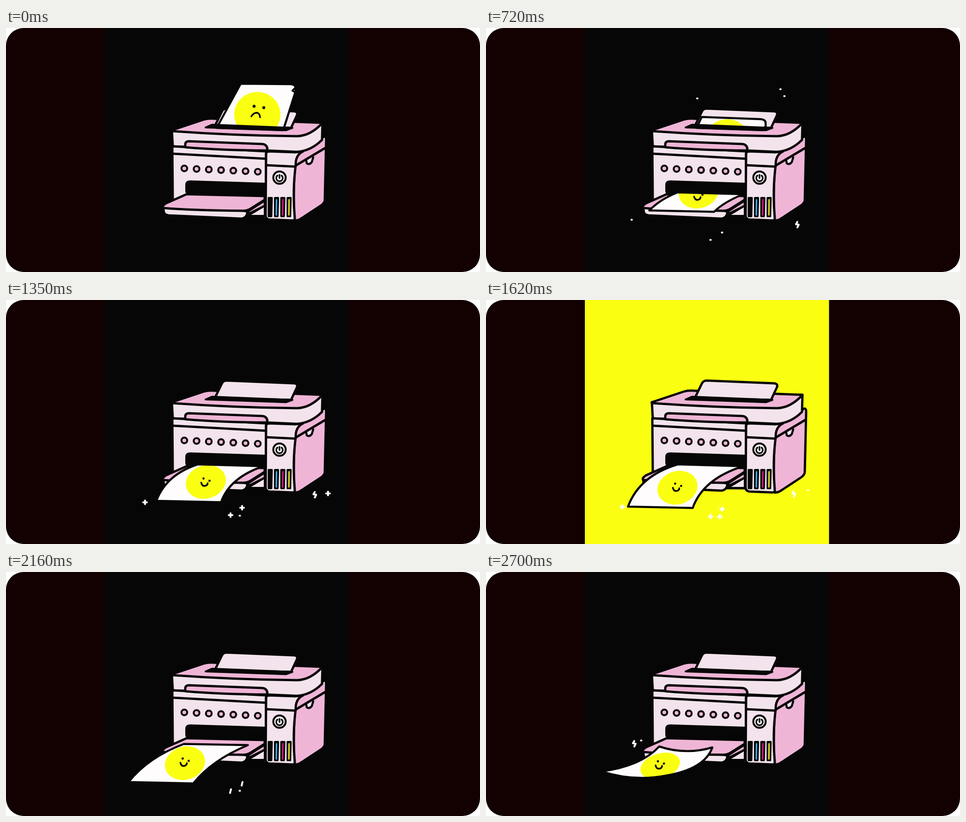
Write an HTML page with a canvas that moves like this. It is 1026 px wide and 530 px high and loops after 2790 ms.

```html
<!DOCTYPE html>
<html lang="en">
<head>
<meta charset="utf-8">
<title>Printer</title>
<style>
html, body { margin: 0; width: 100%; height: 100%; overflow: hidden; background: #fff; }
canvas { display: block; border-radius: 38px; background: #130000; }
</style>
</head>
<body>
<canvas id="stage" width="1026" height="530"></canvas>
<script>
const ctx = document.getElementById('stage').getContext('2d');
const INK = '#060606', LIGHT = '#f3e3ec', PINK = '#efb5d6', WHITE = '#fffcfe', YELLOW = '#faff12';
const STEP = 90, STEPS = 31;
const HELD = [7, 14, 28];   // steps that repeat the previous pose

// start, end, looks over its life, sideways spread, fall, colour, places
const SPARKS = [
  [180, 800, '|.', -0.06, 55, WHITE, [[455, 105], [645, 85], [654, 100]]],
  [180, 400, '|', 0, 5, WHITE, [[434, 158]]],
  [180, 400, '.', 0, 2, INK, [[658, 164], [296, 423], [324, 435]]],
  [600, 2250, '.++|', 0, 18, WHITE, [[511, 443], [486, 459]]],
  [600, 1800, '.++', 0.15, 44, WHITE, [[318, 412]]],
  [600, 1800, 's', -0.06, -8, WHITE, [[675, 428]]],
  [1170, 2250, '.+.', 0, 9, WHITE, [[506, 467]]],
  [1170, 1700, '+.', 0, -14, WHITE, [[697, 425]]],
  [2610, 2800, 's', 0, 0, WHITE, [[321, 373]]],
  [2610, 2800, '.', 0, 0, WHITE, [[336, 366]]]
];
const LOOKS = {
  '.': 'M-.5 0H.5',
  '|': 'M1-4L-1 4',
  '+': 'M-4 0H4M0-4V4',
  's': 'M0-6L-3-1L3 0L0 6'
};

const clamp = v => Math.max(0, Math.min(1, v));

// value at k (0..1) on a line through evenly spaced keys
function along(keys, k) {
  const i = Math.min(keys.length - 2, Math.floor(k * (keys.length - 1)));
  return keys[i] + (keys[i + 1] - keys[i]) * (k * (keys.length - 1) - i);
}

function shape(path, fill, line = 5, color = INK) {
  const p = path instanceof Path2D ? path : new Path2D(path);
  if (fill) { ctx.fillStyle = fill; ctx.fill(p); }
  if (line) { ctx.lineWidth = line; ctx.strokeStyle = color; ctx.stroke(p); }
}

function disc(x, y, rx, ry, fill, line = 0, tilt = 0) {
  const p = new Path2D();
  p.ellipse(x, y, rx, ry, tilt, 0, 7);
  shape(p, fill, line);
}

// a page with a face on it; eyes and mouth are placed from the face's centre
function sheet(outline, { x, y, rx, ry, tilt = 0, shift = 0, eyes, mouth }) {
  const p = new Path2D(outline);
  shape(p, WHITE, 0);
  ctx.save();
  ctx.clip(p);
  disc(x, y, rx, ry, YELLOW, 0, tilt);
  ctx.translate(x, y + shift);
  for (const [ex, ey, r] of eyes) disc(ex, ey, r, r, INK);
  shape(mouth, null, 3.6);
  ctx.restore();
  shape(p, null, 4.5);
}

// the page sinking into the top
function drawFeed(t) {
  const u = t / 900;
  const drop = 100 * u ** 1.45, sink = 70 * u ** 0.75;
  const lx = 508 - 0.57 * drop, ly = 121 + drop;
  const rx = 628 - 0.3 * drop, ry = 123 + 1.05 * drop;
  sheet(`M456 217L${lx} ${ly}L${rx - 12} ${ry - 1}Q${rx} ${ry} ${rx - 1} ${ry + 9}L${rx - 1} ${ry + 14}L600 222Z`, {
    x: 544 - 0.37 * sink, y: 188 + sink, rx: 50, ry: 49,
    eyes: [[-7, -18, 3.2], [14, -15, 3.2]],
    mouth: 'M-13 4Q-8-4-1-4Q5-3 6 6'
  });
  if (t < 600) shape(`M${rx - 2} ${ry + 7}L${rx - 8} ${ry + 13}L${rx - 3} ${ry + 16}`, null, 4);
}

// the page sliding out: it droops, lets go of the slot, then curls up
function drawPrint(t) {
  const s = (t - STEP) / (2700 - STEP);
  const free = clamp((t - 1620) / 1080), slip = 1 - (1 - free) ** 2;
  const bend = 30 * Math.sin(4 * s * s), sag = Math.max(0, -0.8 * bend);
  const ax = 415 - 40 * slip, ay = 357 + 22 * slip;
  const bx = 557 - 67 * free, by = 361 + 20 * slip;
  const dx = along([401, 357, 340, 305, 264, 250], s), dy = 363 + 94 * Math.sin(2.3 * s ** 1.3);
  const cx = dx + 140, cy = dy + 3 + sag / 3;
  const ex = (ax + dx) / 2 - bend, ey = (ay + dy) / 2 - 0.7 * bend;
  sheet(`M${ax} ${ay}Q${(ax + bx) / 2} ${(ay + by) / 2 + sag} ${bx} ${by}Q${ex + 138} ${ey + 6} ${cx} ${cy}` +
    `Q${(cx + dx) / 2} ${(cy + dy) / 2 + sag} ${dx} ${dy}Q${ex} ${ey} ${ax} ${ay}Z`, {
    x: dx + 107 + 20 * slip, y: dy - 41 + 1.6 * sag, rx: 44, ry: 36 - 0.5 * sag,
    tilt: -0.3, shift: 36 * (1 - s) ** 4,
    eyes: [[-5, -10, 2.4], [8, -5, 2.4]],
    mouth: 'M-10-1Q-8 7-2 6Q4 5 4 0'
  });
}

function drawPrinter(t) {
  // body and right side
  shape('M359 250L361 374L560 409L563 270L690 236Q693 236 693 241L690 376Q688 381 680 386L640 413Q632 418 622 418L565 416', LIGHT, 0);
  shape('M626 300Q624 276 636 271L684 239Q693 231 693 243L690 374Q689 381 681 386L640 413Q632 419 624 418Q621 350 626 300Z', PINK);
  shape('M625 300L692 260');
  shape('M650 288L651 294Q657 298 662 291L665 281', LIGHT, 4.5);
  // lid
  shape('M359 222L361 257L630 269Q660 267 684 243L685 206Z', LIGHT);
  shape('M359 222L428 199Q437 196 450 197L685 206Q660 234 630 235Q500 234 359 224Z', PINK);
  shape('M452 213L467 182Q470 175 478 175L624 181Q632 182 630 189L617 217Z', LIGHT);
  if (t < 900) drawFeed(t);
  shape('M432 216L446 210L620 217L606 222Z', INK, 4);
  // front
  shape('M360 257L361 374L400 408L563 409L563 268Z', LIGHT);
  shape('M388 259V253Q388 246 396 246L555 252Q566 253 566 266Q470 266 388 259Z', PINK);
  shape('M361 273L563 284');
  for (let i = 0; i < 7; i++) disc(386 + 26.5 * i, 305 + 1.2 * i, 6.2, 6.2, PINK, 4.2);
  shape('M390 341Q390 333 398 333L560 338V364L396 362Q390 360 390 352Z', INK, 4);
  // tray
  shape('M525 407L560 386V408L525 408Z', LIGHT, 4);
  shape('M524 398L560 375V386L526 403Z', PINK, 4.5);
  shape('M340 390L342 401Q344 406 352 407L508 414Q521 414 523 399L515 397Z', LIGHT);
  shape('M391 361L346 381Q336 388 341 391Q400 396 513 397Q522 397 530 392L560 373V365Z', PINK);
  // control column
  shape('M563 273Q564 268 570 268L626 270L643 268Q626 276 627 299Q620 350 625 412Q626 418 620 418L570 416Q562 415 562 407Z', LIGHT);
  shape('M563 298L625 301');
  disc(592, 325, 13.4, 13.4, WHITE, 4.2);
  shape('M587.5 320.5A7 7 0 1 0 596.5 320.5M592 319V326', null, 3.6);
  [INK, '#37b3e6', '#d5197c', '#e3dc25'].forEach((color, i) => {
    const x = 571.5 + 13.6 * i;
    shape(`M${x - 3} 369H${x + 4}L${x + 3} 409H${x - 3}Z`, INK, 4);
    shape(`M${x + 0.5} 373L${x} 406`, null, 3.2, color);
  });
}

function drawSparks(t) {
  for (const [start, end, looks, spread, fall, color, places] of SPARKS) {
    const k = (t - start) / (end - start);
    if (k < 0 || k >= 1) continue;
    for (const [x, y] of places) {
      ctx.save();
      ctx.translate(x + (x - 500) * spread * k, y + fall * k);
      shape(LOOKS[looks[Math.floor(k * looks.length)]], null, 4, color);
      ctx.restore();
    }
  }
}

function frame() {
  const tick = Math.floor((performance.now() - start) / STEP) % STEPS;
  const step = HELD.includes(tick) ? tick - 1 : tick;
  const t = step * STEP;
  ctx.clearRect(0, 0, 1026, 530);
  ctx.fillStyle = INK;
  ctx.fillRect(213, 0, 530, 530);
  if (Math.floor((step + 1) / 3.7) % 2) {
    ctx.fillStyle = YELLOW;
    ctx.fillRect(214, 0, 528.5, 530);
  }
  drawPrinter(t);
  if (t > STEP) drawPrint(t);
  drawSparks(t);
  requestAnimationFrame(frame);
}

ctx.lineJoin = ctx.lineCap = 'round';
const start = performance.now();
frame();
</script>
</body>
</html>
```
